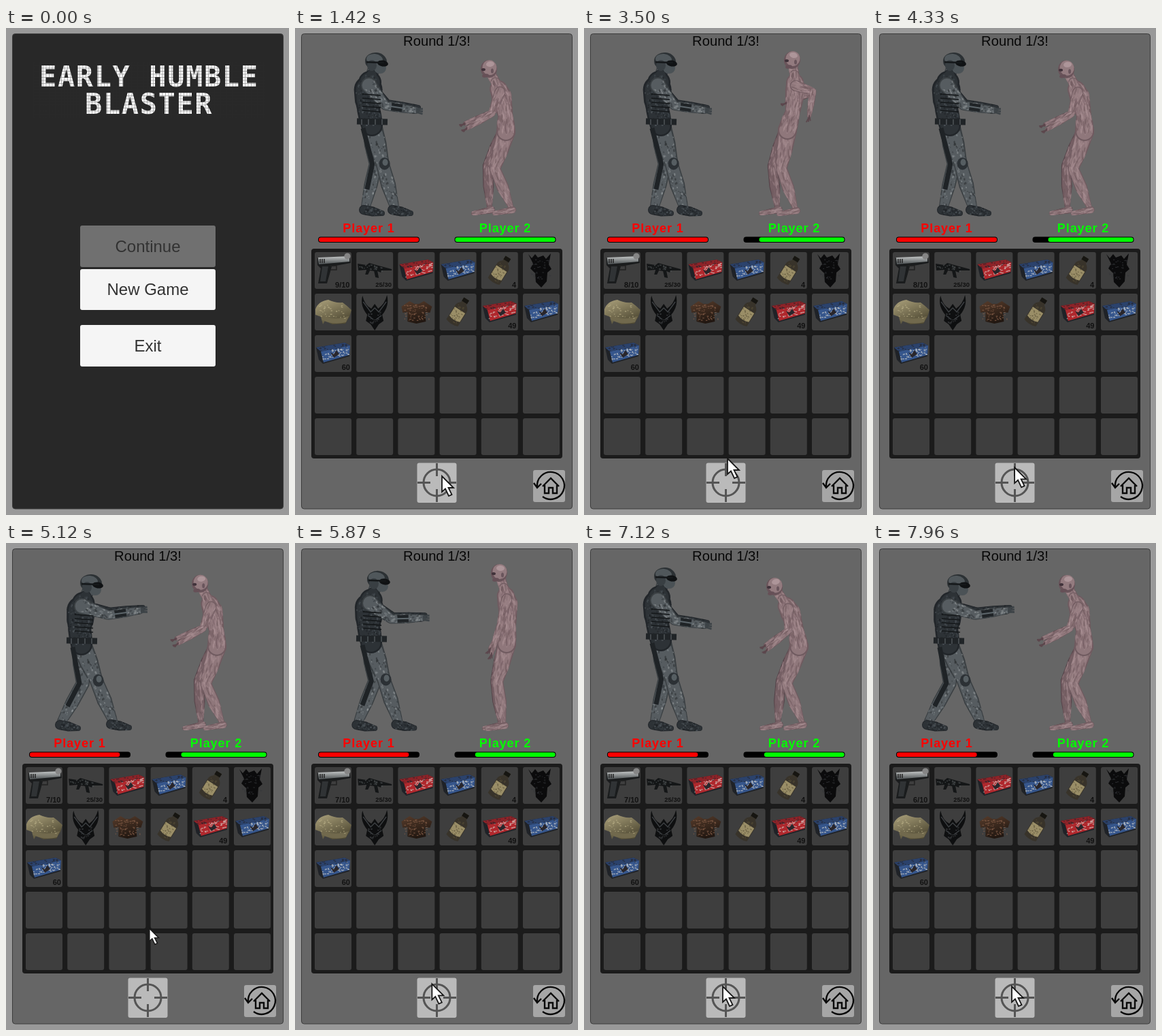
An HTML page with a canvas that plays this animation: 416x715 px, repeating every 8000 ms.

```html
<!DOCTYPE html>
<html lang="en">
<head>
<meta charset="utf-8">
<title>Shooter duel</title>
<style>
html, body { margin: 0; width: 100%; height: 100%; overflow: hidden; background: #999; }
svg, canvas { position: absolute; left: 0; top: 0; display: block; }
text { font-family: "Liberation Sans", Arial, sans-serif; }
.title { font: bold 42px "DejaVu Sans Mono", monospace; letter-spacing: 1.6px; fill: #fff; }
.label { font-size: 24px; fill: #323232; text-anchor: middle; }
.player { font-size: 18px; font-weight: bold; letter-spacing: .9px; text-anchor: middle; }
.count { font-size: 11px; font-weight: bold; fill: #111; text-anchor: end; }
</style>
</head>
<body>
<svg width="416" height="715" viewBox="0 0 416 715">
  <defs>
    <pattern id="mesh" width="4.5" height="4.5" patternUnits="userSpaceOnUse">
      <path d="M0 .4H4.5M.4 0V4.5" stroke="#282828" stroke-width=".7" opacity=".55"/>
    </pattern>
    <linearGradient id="steel" x2="0" y2="1"><stop stop-color="#c4c7c7"/><stop offset="1" stop-color="#4b5052"/></linearGradient>
    <linearGradient id="cloth" x2=".6" y2="1"><stop stop-color="#aca27c"/><stop offset="1" stop-color="#4f4933"/></linearGradient>
    <linearGradient id="leather" x2=".4" y2="1"><stop stop-color="#573c2b"/><stop offset="1" stop-color="#211711"/></linearGradient>
  </defs>
  <rect width="416" height="715" fill="#999"/>
  <rect id="panel" x="9.5" y="8.5" width="398" height="697.5" rx="4" stroke="#3c3c3c"/>
  <g id="menu">
    <text class="title" x="49" y="86">EARLY HUMBLE</text>
    <text class="title" x="116" y="126">BLASTER</text>
    <rect x="40" y="50" width="340" height="82" fill="url(#mesh)"/>
    <rect x="109" y="290" width="199" height="61" rx="3" fill="#707070"/>
    <rect x="109" y="354" width="199" height="60" rx="3" fill="#f5f5f5"/>
    <rect x="109" y="436" width="199" height="61" rx="3" fill="#f5f5f5"/>
    <text class="label" x="208.5" y="329">Continue</text>
    <text class="label" x="208.5" y="392">New Game</text>
    <text class="label" x="208.5" y="475">Exit</text>
  </g>
  <g id="game">
    <text x="208.5" y="26" font-size="20.2" text-anchor="middle" fill="#080808">Round 1/3!</text>
    <text class="player" x="108.5" y="300" fill="#f00">Player 1</text>
    <text class="player" x="309" y="300" fill="#0f0">Player 2</text>
    <rect x="34" y="306.5" width="149" height="8.5" rx="4" fill="#000"/>
    <rect x="234.5" y="306.5" width="149" height="8.5" rx="4" fill="#000"/>
    <rect id="red" x="35" y="307.5" height="6.5" rx="3" fill="#f00"/>
    <rect id="green" y="307.5" height="6.5" rx="3" fill="#0f0"/>
    <rect x="24" y="324" width="369" height="308" rx="4" fill="#1b1b1b"/>
    <g id="slots"></g>
    <text id="ammo" class="count" x="80.5" y="380.5"></text>
    <text class="count" x="142" y="380" style="font-size:9.5px">25/30</text>
    <text class="count" x="325" y="380.5">4</text>
    <text class="count" x="325.5" y="441">49</text>
    <text class="count" x="81" y="502">60</text>
    <rect id="fire" x="179.5" y="638.5" width="58" height="58.5" rx="3"/>
    <g fill="none" stroke="#555" stroke-width="3">
      <circle cx="208.5" cy="667.5" r="19.5"/>
      <path d="M208.5 639v19M208.5 677v19M180 667.5h19M218 667.5h19"/>
    </g>
    <rect x="350" y="649" width="47" height="47" rx="3" fill="#a6a6a6"/>
    <g fill="none" stroke="#0a0a0a" stroke-width="2.4">
      <path d="M356 674A20 20 0 1 1 364 688M351 668l5 7 6-6M364 673l12-12 12 12M367 671v12h6v-8h6v8h6v-12"/>
    </g>
    <path id="cursor" d="M0 0V23L5 18.5 10 29 14.5 27 9.5 17H17Z" fill="#fff" stroke="#181818" stroke-width="1.8"/>
  </g>
</svg>
<canvas id="duel" width="416" height="290"></canvas>
<script>
const LOOP = 8000, MENU_END = 540;
const $ = id => document.getElementById(id);
const ctx = $('duel').getContext('2d');

function random(seed) {
  return () => {
    seed = (seed * 16807 + 11) % 2147483647;
    return seed / 2147483647;
  };
}

// ---------- Inventory ----------
const path = (d, fill, extra = '') => `<path d="${d}" fill="${fill}" ${extra}/>`;

// Short random dashes scattered over a slanted area
function specks(seed, count, [x, y, w, h], slope, color) {
  const rnd = random(seed);
  let d = '';
  for (let i = 0; i < count; i++) {
    const u = rnd() * w;
    d += `M${(x + u).toFixed(1)} ${(y + rnd() * h + u * slope).toFixed(1)}h${(1 + rnd() * 2).toFixed(1)}`;
  }
  return path(d, 'none', `stroke="${color}" stroke-width="1.2" opacity=".7"`);
}

const ammoBox = (top, front, seed) => path('M2 18L44 11 52 15 51 31 12 42 6 36Z', '#1f2227')
  + path('M2 18L44 11 52 15 9 24Z', top)
  + path('M9 24L52 15 51 29 13 40Z', front)
  + specks(seed, 60, [11, 24, 38, 13], -.22, '#d8d6d0')
  + specks(seed + 5, 25, [6, 18, 40, 6], -.15, '#23232a')
  + path('M23 25l5 3 4-6 4 6-8 5z', '#29262b');

const redBox = ammoBox('#8e2328', '#b0282d', 91), blueBox = ammoBox('#2b426c', '#36568c', 377);

const pistol = path('M4 9L51 6 53 16 25 21 22 32 18 46 5 46 9 24 4 19Z', '#1a1c1d')
  + path('M5 8L51 6V14L6 18Z', 'url(#steel)')
  + path('M11 21h9l-4 22H8z', '#303335')
  + path('M23 20h9v6h-9M8 10v6M11 10v6M14 10v6', 'none', 'stroke="#222" stroke-width="1.5"')
  + '<circle cx="48" cy="6" r="4.6" fill="#858585"/>';

const rifle = path('M2 17L15 19 19 16 33 20 52 25V27L37 27 36 30 31 28 33 38 28 37 26 28 20 27 17 33 13 33 15 26 3 27Z', '#141617')
  + specks(12, 24, [4, 17, 34, 8], .12, '#55595b');

const bottle = '<g transform="rotate(32 27 27)">'
  + path('M23 4h9v8q6 4 6 9v24q-10 4-20 0V21q0-5 5-9z', '#38332a')
  + path('M19 23h18v15q-9 4-18 0z', '#9a8e67')
  + path('M23 4h9v6h-9z', '#161511')
  + specks(33, 30, [19, 17, 15, 26], 0, '#5d5339') + '</g>';

const demon = path('M8 3l5 6 5-6 4 5 8-3 4 5 7-8-3 16 4 7-6 5-1 13-8 9-8-8-1-13-7-7 4-7z', '#0b0b0c')
  + specks(71, 40, [11, 11, 28, 32], 0, '#34363a');

const beret = path('M1 23Q5 11 20 9 30 14 41 13 48 18 54 24L51 34 45 44 26 45 15 40 12 45 9 34 1 31Z', 'url(#cloth)')
  + path('M10 31Q25 41 50 33L46 42Q27 47 10 38Z', '#71694d')
  + specks(17, 35, [6, 14, 38, 20], .1, '#b8ae86');

const horned = path('M9 3Q12 17 22 22L27 15 32 22Q42 15 45 2 49 18 38 31L40 40 33 45 27 54 21 45 14 40 16 31Q5 18 9 3Z', '#0e0f10')
  + path('M10 12l11 15 6-6 6 6 11-15M17 32l8 6M37 32l-8 6', 'none', 'stroke="#3d4043" stroke-width="1.4"')
  + specks(24, 24, [17, 27, 18, 18], 0, '#44474a');

const armor = path('M5 19L17 11 24 15H31L38 11 50 19 47 28 40 27 41 41 27 44 14 41 14 27 7 28Z', 'url(#leather)')
  + specks(8, 70, [9, 16, 36, 24], 0, '#8a624a');

const items = [pistol, rifle, redBox, blueBox, bottle, demon, beret, horned, armor, bottle, redBox, blueBox, blueBox];

$('slots').innerHTML = Array.from({ length: 30 }, (_, i) => {
  const x = 29 + i % 6 * 61.2, y = 329 + Math.floor(i / 6) * 61;
  return `<g transform="translate(${x} ${y})"><rect width="54" height="54" rx="3" fill="#3e3e3e"/>${items[i] || ''}</g>`;
}).join('');

// ---------- Motion helpers ----------
const clamp = x => Math.min(1, Math.max(0, x));
const ease = x => x * x * (3 - 2 * x);
const ramp = (t, from, to) => ease(clamp((t - from) / (to - from)));
const mix = (a, b, u) => a.map((v, i) => Array.isArray(v) ? mix(v, b[i], u) : v + (b[i] - v) * u);

function sample(keys, t) {
  const i = keys.findIndex(k => k[0] > t);
  if (i < 0) return keys[keys.length - 1][1];
  if (!i) return keys[0][1];
  const [t0, a] = keys[i - 1], [t1, b] = keys[i];
  return mix(a, b, ramp(t, t0, t1));
}

// ---------- Poses: head, hip, near hand, far hand, near ankle, far ankle ----------
const stand = [[119, 51], [113, 143], [178, 121], [181, 117], [146, 262], [104, 262]];
const lean = [[125, 61], [111, 149], [198, 99], [201, 95], [157, 261], [82, 262]];

const upright = [[300, 45], [311, 148], [289, 162], [287, 155], [306, 263], [302, 262]];
const flail = [[321, 51], [302, 150], [359, 112], [284, 118], [321, 262], [291, 262]];
const recoil = [[306, 48], [299, 150], [331, 129], [298, 110], [310, 263], [284, 262]];
const stalk = [[280, 65], [316, 152], [270, 156], [267, 150], [320, 262], [285, 262]];
const claw = [[285, 61], [310, 152], [253, 147], [250, 140], [317, 262], [286, 262]];

// Times count from the latest shot
const monsterMoves = [[300, claw], [700, upright], [1200, upright], [1600, flail], [1800, recoil], [2320, stalk], [2750, claw]];
const cursorPath = [[640, [208, 400]], [1300, [216, 658]], [2600, [216, 658]], [3200, [211, 632]],
  [4000, [211, 632]], [4600, [206, 655]], [5080, [211, 565]], [5700, [201, 647]], [6500, [204, 651]]];

// ---------- Skeleton ----------
// Middle joint of a two-bone limb; side picks the way it bends
function bend([ax, ay], [bx, by], upper, lower, side) {
  const dx = bx - ax, dy = by - ay, d = Math.hypot(dx, dy);
  const along = (upper ** 2 - lower ** 2 + d * d) / (2 * d);
  const out = Math.sqrt(Math.max(0, upper ** 2 - along ** 2)) * side;
  return [ax + (dx * along + dy * out) / d, ay + (dy * along - dx * out) / d];
}

function skeleton([head, hip, nearHand, farHand, nearAnkle, farAnkle], { facing, hunch, arm, leg }) {
  const spine = u => {
    const [x, y] = mix(head, hip, u);
    return [x - facing * hunch * Math.sin(Math.PI * u), y];
  };
  const shoulder = spine(.36);
  const armTo = hand => [shoulder, bend(shoulder, hand, ...arm, -facing * .6), hand];
  const legTo = ankle => [hip, bend(hip, ankle, ...leg, facing), ankle];
  const foot = ([x, y]) => [[x - facing * 3, y + 5], [x + facing * 24, y + 10]];
  return {
    head, hip, spine,
    neck: [head, spine(.22)],
    torso: [spine(.2), spine(.43), spine(.74), hip],
    nearArm: armTo(nearHand), farArm: armTo(farHand),
    nearLeg: legTo(nearAnkle), farLeg: legTo(farAnkle),
    nearFoot: foot(nearAnkle), farFoot: foot(farAnkle)
  };
}

const soldierRig = { facing: 1, hunch: 9, arm: [43, 50], leg: [57, 64] };
const monsterRig = { facing: -1, hunch: 8, arm: [38, 45], leg: [57, 60] };

// ---------- Figures ----------
const fabric = { edge: '#3a3f42', fill: '#565c60', marks: ['#7c8387', '#34393d', '#959b9d', '#2a2e31'], stretch: 1.5 };
const vest = { edge: '#22262a', fill: '#2d3236', marks: ['#464d52', '#191c1f', '#5a6267', '#222629'], stretch: 1.2 };
const flesh = { edge: '#705b60', fill: '#8f777b', marks: ['#ab9296', '#6f595e', '#a0878b', '#7a6368'], stretch: 4.5 };
const darkFlesh = { ...flesh, edge: '#56444a', fill: '#755f64' };

// Part, radii (with one between every two joints), material; back to front
const soldierParts = [
  ['farArm', [8, 8, 7, 6, 4], vest],
  ['farLeg', [14, 14, 10, 10, 7], fabric], ['farFoot', [7, 7, 4], vest],
  ['nearLeg', [15, 14, 10, 11, 7], fabric], ['nearFoot', [7, 7, 4], vest],
  ['neck', [9, 9, 9], fabric],
  ['torso', [9, 17, 21, 20, 17, 17, 16], vest],
  ['nearArm', [12, 9, 7, 7, 5], fabric]
];
const monsterParts = [
  ['farArm', [6, 5, 4, 4, 3], darkFlesh],
  ['farLeg', [12, 11, 7, 8, 4], darkFlesh], ['farFoot', [5, 4, 3], darkFlesh],
  ['nearLeg', [14, 12, 8, 9, 4], flesh], ['nearFoot', [5, 4, 3], flesh],
  ['neck', [8, 7, 7], flesh],
  ['torso', [7, 13, 15, 13, 11, 13, 14], flesh],
  ['nearArm', [8, 7, 5, 5, 3], flesh]
];

function chain(joints, radii) {
  return radii.map((r, i) => {
    const a = joints[i >> 1], b = joints[i + 1 >> 1];
    return [...mix(a, b, .5), r];
  });
}

function outline(nodes, scale = 1) {
  const shape = new Path2D();
  nodes.forEach(([x, y, r], i) => {
    r *= scale;
    shape.moveTo(x + r, y);
    shape.arc(x, y, r, 0, 7);
    if (!i) return;
    const [a, b, q] = nodes[i - 1], d = Math.hypot(x - a, y - b) || 1;
    const nx = (y - b) / d, ny = (a - x) / d, s = q * scale;
    shape.moveTo(a + nx * s, b + ny * s);
    shape.lineTo(x + nx * r, y + ny * r);
    shape.lineTo(x - nx * r, y - ny * r);
    shape.lineTo(a - nx * s, b - ny * s);
    shape.closePath();
  });
  return shape;
}

function blob(x, y, rx, ry, angle, fill) {
  ctx.fillStyle = fill;
  ctx.beginPath();
  ctx.ellipse(x, y, rx, ry, angle, 0, 7);
  ctx.fill();
}

function line(color, width, ...points) {
  ctx.strokeStyle = color;
  ctx.lineWidth = width;
  ctx.beginPath();
  points.forEach(p => ctx.lineTo(...p));
  ctx.stroke();
}

function drawPart(nodes, skin, seed) {
  const rnd = random(seed), shape = outline(nodes);
  ctx.save();
  ctx.fillStyle = skin.edge;
  ctx.fill(shape);
  ctx.clip(shape);
  ctx.fillStyle = skin.fill;
  ctx.fill(outline(nodes, .85));
  ctx.globalAlpha = .55;
  for (let i = 1; i < nodes.length; i++) {
    const [a, b, r] = nodes[i - 1], [x, y] = nodes[i];
    const angle = Math.atan2(y - b, x - a);
    for (let k = 0; k < 28; k++) {
      const u = rnd(), v = (rnd() * 2 - 1) * r * .9, size = .5 + rnd();
      blob(a + (x - a) * u - Math.sin(angle) * v, b + (y - b) * u + Math.cos(angle) * v,
        size * skin.stretch, size, angle + (rnd() - .5) * .6, skin.marks[k % 4]);
    }
  }
  ctx.restore();
}

function drawBody(parts, body, seed) {
  parts.forEach(([name, radii, skin], i) => drawPart(chain(body[name], radii), skin, seed + i * 977));
}

function drawFingers([, elbow, hand], color, width, length, spread) {
  const a = Math.atan2(hand[1] - elbow[1], hand[0] - elbow[0]);
  for (let i = -1; i < 2; i++) {
    const b = a + i * spread, y = hand[1] + i * width * .8;
    line(color, width, [hand[0], y], [hand[0] + Math.cos(b) * length, y + Math.sin(b) * length]);
  }
}

function drawSoldier(body) {
  drawBody(soldierParts, body, 4001);
  const [x, y] = body.head, [hx, hy] = body.hip, [cx, cy] = body.spine(.5);
  const [, knee, ankle] = body.farLeg, [, shin] = body.nearLeg, [, elbow, hand] = body.nearArm;
  for (let i = 0; i < 5; i++) line('#15181a', 1.6, [cx - 8, cy + i * 6], [cx + 19, cy + 2 + i * 6]);
  line('#202427', 9, [hx - 22, hy - 6], [hx + 23, hy - 5]);
  for (let i = 0; i < 4; i++) line('#5a6064', 1.2, [hx - 15 + i * 10, hy - 9], [hx - 15 + i * 10, hy - 1]);
  line('#1f2326', 7, [hx - 13, hy + 4], [knee[0] - 5, knee[1]], mix(knee, ankle, .6).map((v, i) => v - 4 * (1 - i)));
  blob(shin[0] + 3, shin[1], 8, 9, 0, '#2c3135');
  blob(shin[0] + 4, shin[1] - 2, 4, 5, 0, '#565e62');
  blob(x, y - 2, 16, 13, .1, '#2c3134');
  blob(x - 2, y - 5, 12, 8, .1, '#50575b');
  blob(x + 6, y + 8, 9, 8, 0, '#4b5256');
  blob(x - 6, y + 4, 7, 8, 0, '#393f43');
  blob(x + 10, y + 1, 8, 4.5, .15, '#101214');
  line('#15181a', 2.5, [x - 14, y - 1], [x + 12, y]);
  line('#202427', 11, mix(elbow, hand, .2), mix(elbow, hand, .55));
  line('#5d666b', 2, mix(elbow, hand, .15), mix(elbow, hand, .6));
  drawFingers(body.nearArm, '#3d4347', 2.8, 10, .15);
}

function drawMonster(body) {
  drawBody(monsterParts, body, 7013);
  const [x, y] = body.head, [nx, ny] = body.spine(.22);
  const tilt = Math.atan2(ny - y, nx - x) - 1.2;
  blob(x, y - 1, 12, 13, tilt, '#69545a');
  blob(x + 1, y - 3, 10.5, 11, tilt, '#937b7f');
  blob(x + 2, y - 8, 6, 4, tilt, '#ad9599');
  blob(x - 8, y, 3, 2, 0, '#40323a');
  blob(x - 5, y + 9, 5, 2.5, -.2, '#665057');
  blob(x + 5, y + 2, 2, 3.5, 0, '#69555c');
  drawFingers(body.nearArm, '#5c474d', 1.8, 9, .35);
  drawFingers(body.farArm, '#5c474d', 1.8, 9, .35);
}

// ---------- Timeline ----------
// The first shot falls before the loop and only sets the phase of the opening pose
const shots = [-1300, 1700, 4790, 7660];
const firedBy = t => shots.filter(s => s <= t).length - 1;
const COUNTER_LEAD = 150, HIT_DELAY = 950, BAR = 147;
const start = performance.now();

function render() {
  const t = (performance.now() - start) % LOOP, playing = t >= MENU_END;
  $('panel').setAttribute('fill', playing ? '#666' : '#282828');
  $('menu').style.display = playing ? 'none' : '';
  $('game').style.display = playing ? '' : 'none';
  ctx.clearRect(0, 0, 416, 290);
  if (playing) {
    const fired = firedBy(t), since = t - shots[fired], hits = firedBy(t - HIT_DELAY);
    const red = BAR * (1 - .1 * Math.max(0, firedBy(t + COUNTER_LEAD) - 1));
    const green = BAR * (hits > 0 ? .9 - .05 * hits : 1);
    $('red').setAttribute('width', red);
    $('green').setAttribute('width', green);
    $('green').setAttribute('x', 382.5 - green);
    $('ammo').textContent = `${9 - fired}/10`;
    $('fire').setAttribute('fill', since < 110 ? '#999' : '#bababa');
    const [x, y] = sample(cursorPath, t);
    $('cursor').setAttribute('transform', `translate(${x} ${y}) scale(${y > 620 ? 1 : .8})`);
    const aim = ramp(since, 0, 260) - ramp(since, 750, 1400);
    drawSoldier(skeleton(mix(stand, lean, aim), soldierRig));
    drawMonster(skeleton(sample(monsterMoves, since), monsterRig));
  }
  requestAnimationFrame(render);
}
render();
</script>
</body>
</html>
```
